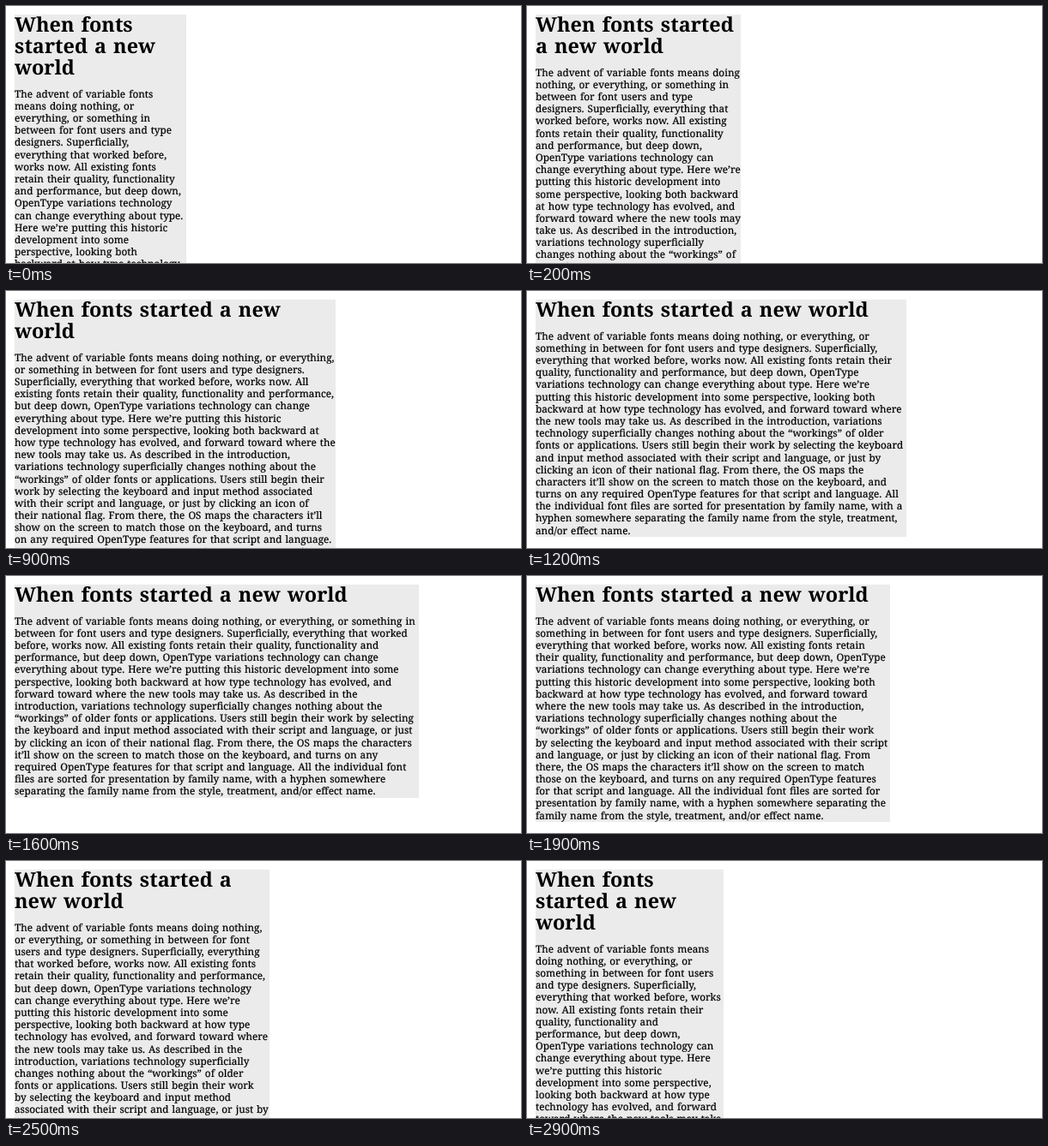
Animation of 600 by 300 pixels, one loop 3 s. Source, as an HTML page:

```html
<!DOCTYPE html>
<html lang="en">
<head>
<meta charset="utf-8">
<title>Reflowing text column</title>
<style>
  html, body { margin: 0; width: 100%; height: 100%; overflow: hidden; background: #fff; }
  svg { display: block; width: 600px; height: 300px; overflow: hidden; }
  text { font-family: "Noto Serif", serif; fill: #000; text-rendering: geometricPrecision; }
  .title { font-weight: 700; }
  .body { stroke: #000; stroke-width: 0.2px; }
</style>
</head>
<body>
<svg viewBox="0 0 600 300">
  <rect id="box" x="10" y="10" fill="#ebebeb"/>
  <g id="lines"></g>
</svg>
<script>
const STEP = 100, STEPS = 30, LEFT = 10, TOP = 10;
const MIN_W = 200, MAX_W = 490;
const TITLE_LEADING = 25, BODY_LEADING = 14.17;

const title = "When fonts started a new world";
const body = "The advent of variable fonts means doing nothing, or everything, or something in " +
  "between for font users and type designers. Superficially, everything that worked before, " +
  "works now. All existing fonts retain their quality, functionality and performance, but deep " +
  "down, OpenType variations technology can change everything about type. Here we’re putting " +
  "this historic development into some perspective, looking both backward at how type technology " +
  "has evolved, and forward toward where the new tools may take us. As described in the " +
  "introduction, variations technology superficially changes nothing about the “workings” of older " +
  "fonts or applications. Users still begin their work by selecting the keyboard and input method " +
  "associated with their script and language, or just by clicking an icon of their national flag. " +
  "From there, the OS maps the characters it’ll show on the screen to match those on the keyboard, " +
  "and turns on any required OpenType features for that script and language. All the individual font " +
  "files are sorted for presentation by family name, with a hyphen somewhere separating the family " +
  "name from the style, treatment, and/or effect name.";

// Letter advances in thousandths of an em, used for line breaking.
const advances = {
  a: 530, bdp: 614, c: 492, e: 535, f: 369, g: 538, h: 635, i: 325, j: 300, k: 640,
  l: 310, m: 944, n: 645, o: 600, q: 613, r: 471, s: 451, t: 352, u: 634, v: 565,
  w: 778, x: 565, y: 542, z: 515, TF: 595, A: 705, H: 780, O: 724, S: 640, U: 720,
  ",.": 249, "’": 220, "“”": 440, "/": 320
};
const advance = {};
for (const [chars, w] of Object.entries(advances))
  for (const c of chars) advance[c] = w;

const bodyWidth = word => [...word].reduce((sum, c) => sum + advance[c], 0) * 0.01181;
const titleWidths = { When: 70, fonts: 62, started: 82, a: 13, new: 50, world: 70 };

const styles = {
  title: { weight: 700, space: 8, sample: title, length: 348, width: w => titleWidths[w] },
  body: { weight: 400, space: 4, sample: body.slice(0, 64), length: 337, width: bodyWidth }
};

// One font size per style, taken from the length of a sample without its spaces.
const pen = document.createElement("canvas").getContext("2d");
for (const s of Object.values(styles)) {
  pen.font = `${s.weight} 100px "Noto Serif", serif`;
  s.size = 100 * s.length / pen.measureText(s.sample.replace(/ /g, "")).width;
  s.gap = s.space - pen.measureText(" ").width * s.size / 100;
}

function wrap(text, style, limit) {
  const lines = [];
  let used = Infinity;
  for (const word of text.split(" ")) {
    const w = style.width(word);
    if (used + style.space + w > limit) {
      lines.push(word);
      used = w;
    } else {
      lines[lines.length - 1] += " " + word;
      used += style.space + w;
    }
  }
  return lines;
}

const box = document.getElementById("box");
const group = document.getElementById("lines");

function addLine(str, name, y) {
  const t = document.createElementNS("http://www.w3.org/2000/svg", "text");
  t.setAttribute("class", name);
  t.setAttribute("x", LEFT);
  t.setAttribute("y", Math.round(y));
  t.style.fontSize = styles[name].size + "px";
  t.style.wordSpacing = styles[name].gap + "px";
  t.textContent = str;
  group.append(t);
}

function render(width) {
  const heads = wrap(title, styles.title, width);
  const paras = wrap(body, styles.body, width);
  const paraTop = TOP + heads.length * TITLE_LEADING + 11;
  group.textContent = "";
  heads.forEach((s, i) => addLine(s, "title", TOP + 20 + i * TITLE_LEADING));
  paras.forEach((s, i) => addLine(s, "body", paraTop + 10.8 + i * BODY_LEADING));
  box.setAttribute("width", Math.round(width));
  box.setAttribute("height", Math.round(paraTop + paras.length * BODY_LEADING) - TOP);
}

let shown = -1;
function tick() {
  const step = Math.floor(performance.now() / STEP) % STEPS;
  if (step !== shown) {
    shown = step;
    const half = STEPS / 2;
    render(MIN_W + (MAX_W - MIN_W) * (half - Math.abs(step - half)) / half);
  }
  requestAnimationFrame(tick);
}
tick();
</script>
</body>
</html>
```
